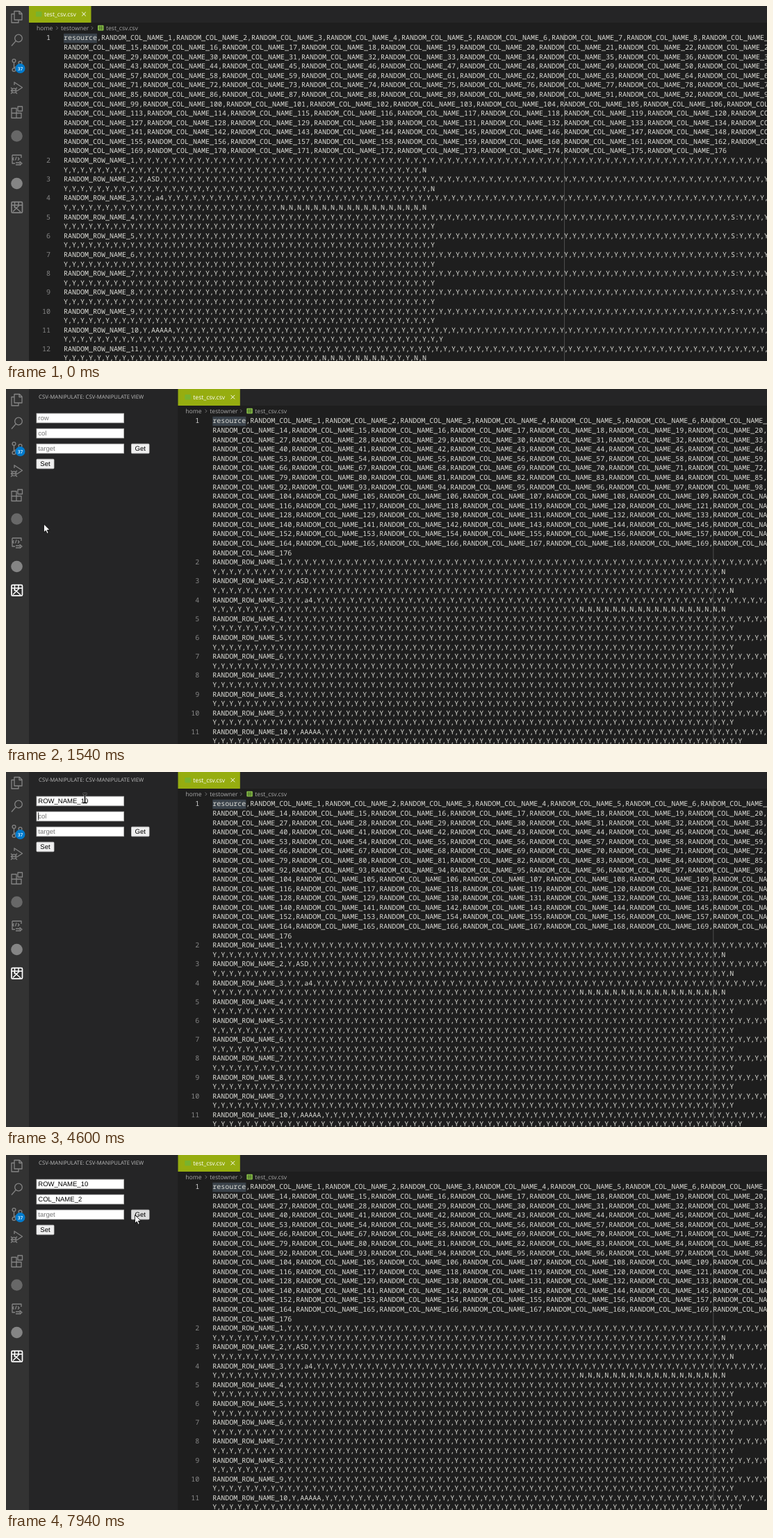
Write an HTML page that moves like this. It is 1095 by 512 pixels and loops after 8 s.

```html
<!DOCTYPE html>
<html lang="en">
<head>
<meta charset="utf-8">
<title>CSV editing in a code editor</title>
<style>
  html, body { margin: 0; width: 100%; height: 100%; overflow: hidden; background: #1e1e1e; }
  svg { display: block; width: 1095px; height: 512px; }
  text { white-space: pre; }
  .code { font: 10px "Noto Sans Mono", "DejaVu Sans Mono", monospace; fill: #dcdcd6; font-variant-ligatures: none; text-rendering: geometricPrecision; }
  .num { fill: #858585; text-anchor: end; }
  .num.current { fill: #d0d0d0; }
  .ui { font: 8.6px "Open Sans", "Noto Sans", sans-serif; fill: #a9a9a9; text-rendering: geometricPrecision; }
  .form { font: 9.52px "Liberation Sans", Arial, sans-serif; fill: #000; text-rendering: geometricPrecision; }
  .icon { fill: none; stroke: #858585; stroke-width: 1.3; stroke-linejoin: round; }
  .hidden { display: none; }
</style>
</head>
<body>
<svg viewBox="0 0 1095 512">
  <rect width="1095" height="512" fill="#1e1e1e"/>
  <rect width="1095" height="24" fill="#252526"/>

  <g id="editor">
    <rect x="33" width="89.5" height="24" fill="#96ad10"/>
    <rect x="43" y="8" width="8.5" height="7.5" rx="1" fill="#78b32e"/>
    <text class="ui" x="55" y="15" style="fill:#fff">test_csv.csv</text>
    <path d="M109.2 8.8l5.6 5.6m0-5.6l-5.6 5.6" stroke="#fff" stroke-width="1"/>
    <text class="ui" x="44" y="35">home</text>
    <text class="ui" x="79" y="35">testowner</text>
    <text class="ui" x="144" y="35">test_csv.csv</text>
    <path d="M72.3 29.5l2.3 2.3-2.3 2.3M122.8 29.5l2.3 2.3-2.3 2.3" fill="none" stroke="#8a8a8a" stroke-width=".8"/>
    <rect x="132" y="27.7" width="8.5" height="7.8" rx="1" fill="#8bc34a"/>
    <path d="M133 30.4h6.5M133 32.9h6.5M135 28.5v6.2M137.6 28.5v6.2" stroke="#38551c" stroke-width=".7"/>
    <rect x="83" y="39.8" width="48" height="13.4" fill="#3a424a"/>
    <path d="M803.5 39.5V512" stroke="#5a5a5a" stroke-width=".8"/>
    <g id="lines"></g>
  </g>

  <g id="sidebar">
    <rect x="33" width="214.3" height="512" fill="#252526"/>
    <text class="ui" x="47" y="14.3" style="font-size:7.75px;fill:#bbb">CSV-MANIPULATE: CSV-MANIPULATE VIEW</text>
    <g id="form"></g>
  </g>

  <rect width="33" height="512" fill="#333"/>
  <g class="icon">
    <path d="M12 7.5h7.5l3.5 3.5v9H12zM19 7.5v4h4M12 11.5H8v12.5h10v-4"/>
    <circle cx="18" cy="46.5" r="5.3"/><path d="M14.2 50.4L8 57.5"/>
    <circle cx="11.5" cy="79" r="2.4"/><circle cx="11.5" cy="92" r="2.4"/><circle cx="20.5" cy="82" r="2.4"/>
    <path d="M11.5 81.4v8.2M20.5 84.4c0 4-8 2-9 5.2"/>
    <path d="M12 114v-4l11.5 7.5-8 5.2"/><circle cx="11.5" cy="122" r="3.2"/>
    <path d="M8.3 122h6.4M7 117.8l2 1.8M6.8 122h1.5M7 126.5l2-1.8M16 117.8l-2 1.8M16 126.5l-2-1.8"/>
    <path d="M8 147.5h7v14H8zM8 154.5h14v7H8M17 145h6.5v6.5H17z"/>
    <path d="M9 215h13v4M9 215v12h4M11.5 218.5l-2 2 2 2M17 218.5l2 2-2 2M15 217.5l-1.5 5M14 226h5M14 229h5M20 224.5l3 2.5-3 2.5z"/>
  </g>
  <circle cx="20.5" cy="90" r="7" fill="#007acc"/>
  <text class="ui" x="20.5" y="92.5" text-anchor="middle" style="font-size:6.6px;font-weight:600;fill:#fff">37</text>
  <circle cx="15.5" cy="187.5" r="8.3" fill="#686868"/>
  <circle cx="15.5" cy="256" r="8.3" fill="#858585"/>
  <g id="tableIcon" class="icon">
    <rect x="8" y="282.7" width="15.5" height="15.5" rx="1.5" stroke-width="1.7"/>
    <path d="M8 287.3h15.5M12.5 283v4.3M18 283v4.3M12.3 287.3v4M10 296.5l9-9M11.5 288.5l9.5 8.5" stroke-width="1.5"/>
  </g>

  <g id="ibeam">
    <path d="M-3-6.5h2.2L0-5.8.8-6.5H3M0-5.8V5.8M-3 6.5h2.2L0 5.8l.8.7H3" fill="none" stroke="#ddd" stroke-width="2.2"/>
    <path d="M-3-6.5h2.2L0-5.8.8-6.5H3M0-5.8V5.8M-3 6.5h2.2L0 5.8l.8.7H3" fill="none" stroke="#000" stroke-width="1.4"/>
  </g>
  <path id="arrow" d="M0 0v12l2.8-2.6 1.9 4.3 2-.9-1.9-4.2h3.9z" fill="#fff" stroke="#000" stroke-width=".8"/>
  <path id="hand" d="M-1.2 0c0-1.6 2.4-1.6 2.4 0v5.2l5.2 1.2c1 .3 1.5 1 1.4 2l-.8 5.2-1.2 2.2H.8L-4 9.5c-1-1.5.6-2.6 1.7-1.5l1.1 1.2z" fill="#fff" stroke="#000" stroke-width=".8"/>
</svg>
<script>
const LOOP = 8000, OPEN_AT = 1130, FORM_AT = 1500, SIDEBAR = 214.3;
const LINE_HEIGHT = 13.59, WIDE = 283, NARROW = 247;
const $ = id => document.getElementById(id);

function add(parent, tag, attrs, content = "") {
  const el = document.createElementNS("http://www.w3.org/2000/svg", tag);
  for (const key in attrs) el.setAttribute(key, attrs[key]);
  el.textContent = content;
  return parent.appendChild(el);
}

// CSV contents
const COLUMNS = 176;
const header = ["resource", ...Array.from({ length: COLUMNS }, (_, i) => `RANDOM_COL_NAME_${i + 1}`)];

function csvRow(n) {
  const cells = Array(COLUMNS).fill("Y");
  const setTail = values => cells.splice(COLUMNS - values.length, values.length, ...values);
  if (n <= 2) setTail("N");
  if (n === 2) cells[1] = "ASD";
  if (n === 3) { cells[2] = "a4"; setTail("N".repeat(18)); }
  if (n >= 4 && n <= 9) cells[71] = "S:Y";
  if (n === 10) cells[1] = "AAAAA";
  if (n === 11) setTail("NNNYNNNNYYYNN");
  return [`RANDOM_ROW_NAME_${n}`, ...cells];
}
const records = [header, ...Array.from({ length: 11 }, (_, i) => csvRow(i + 1))];

function wrap(cells, width) {
  const lines = [""];
  cells.forEach((cell, i) => {
    const token = i < cells.length - 1 ? cell + "," : cell;
    if (lines.at(-1).length + token.length > width) lines.push("");
    lines[lines.length - 1] += token;
  });
  return lines;
}

function buildLayout(width) {
  const group = add($("lines"), "g", {});
  let y = 49.4;
  records.forEach((cells, i) => {
    add(group, "text", { class: i ? "code num" : "code num current", x: 64, y }, i + 1);
    for (const line of wrap(cells, width)) {
      add(group, "text", { class: "code", x: 83, y }, line.slice(0, 172));
      y += LINE_HEIGHT;
    }
  });
  return group;
}
const wideLayout = buildLayout(WIDE), narrowLayout = buildLayout(NARROW);

// Sidebar form
function addField(y, placeholder) {
  add($("form"), "rect", { x: 44, y, width: 125.5, height: 13.6, fill: "#fff", stroke: "#b8b8b8", "stroke-width": .8 });
  const label = add($("form"), "text", { class: "form", x: 46.3, y: y + 10 }, placeholder);
  const caret = add($("form"), "rect", { y: y + 1.2, width: .8, height: 10.8 });
  return { label, caret, placeholder };
}

function addButton(x, y, width, label) {
  const box = add($("form"), "rect", { x, y, width, height: 13.6, rx: 1, fill: "#efefef", stroke: "#d2d2d2", "stroke-width": .8 });
  add($("form"), "text", { class: "form", x: x + width / 2, y: y + 10.2, "text-anchor": "middle" }, label);
  return box;
}

const rowField = addField(35.2, "row"), colField = addField(57.2, "col"), targetField = addField(79.2, "target");
const getButton = addButton(180.5, 79.2, 25.5, "Get");
addButton(44, 101.2, 25, "Set");

const rowTyping = {
  text: "ROW_NAME_10",
  keys: [3030, 3127, 3223, 3320, 3510, 3660, 3780, 3950, 4040, 4320, 4450],
  carets: [[2320, 2850], [3030, 4600]]
};
const colTyping = {
  text: "COL_NAME_2",
  keys: [5290, 5390, 5490, 5670, 5860, 5950, 6040, 6130, 6880, 7090],
  carets: [[4600, 5100], [5290, 6700], [6880, 7600]]
};
const idle = { text: "", keys: [], carets: [] };

const show = (el, on) => el.classList.toggle("hidden", !on);

function updateField(field, typing, t) {
  const typed = typing.text.slice(0, typing.keys.filter(k => t >= k).length);
  field.label.textContent = typed || field.placeholder;
  field.label.style.fill = typed ? "#000" : "#757575";
  const width = typed ? field.label.getComputedTextLength() : 0;
  field.caret.setAttribute("x", 46.3 + width);
  show(field.caret, typing.carets.some(([on, off]) => t >= on && t < off));
}

// Pointer: each move runs in a few visible steps, then rests
const moves = [
  { start: 480, end: 950, steps: 6, from: [136, 468], to: [15.5, 291] },
  { start: 1190, end: 1910, steps: 12, from: [16, 289], to: [105, 71] },
  { start: 1980, end: 2320, steps: 5, from: [108, 66], to: [113.5, 38] },
  { start: 7640, end: 7940, steps: 6, from: [118, 41], to: [185.5, 86.5] }
];

function pointerAt(t) {
  const move = moves.findLast(m => t >= m.start);
  if (!move) return null;
  const { start, end, steps, from, to } = move;
  const last = steps - 1;
  const p = Math.min(last, Math.floor((t - start) / (end - start) * last + 1e-6)) / last;
  const eased = p * p * (3 - 2 * p);
  return from.map((v, i) => v + (to[i] - v) * eased);
}

function pointerKind([x, y], t) {
  if (t < OPEN_AT) return x < 33 ? "hand" : "ibeam";
  const overField = t >= FORM_AT && x > 44 && x < 170 && y > 30 && y < 72;
  return overField ? "ibeam" : "arrow";
}

function render(t) {
  const open = t >= OPEN_AT;
  $("editor").setAttribute("transform", `translate(${open ? SIDEBAR : 0})`);
  show(wideLayout, !open);
  show(narrowLayout, open);
  show($("sidebar"), open);
  show($("form"), t >= FORM_AT);

  const pointer = pointerAt(t);
  const kind = pointer && pointerKind(pointer, t);
  for (const id of ["ibeam", "arrow", "hand"]) {
    show($(id), id === kind);
    if (id === kind) $(id).setAttribute("transform", `translate(${pointer})`);
  }
  const iconHover = pointer && pointer[0] < 26;
  $("tableIcon").style.stroke = open || iconHover ? "#fff" : "#858585";
  const getHover = t > 7640 && pointer[0] > 180 && pointer[1] > 79;
  getButton.setAttribute("fill", getHover ? "#dcdcdc" : "#efefef");

  updateField(rowField, rowTyping, t);
  updateField(colField, colTyping, t);
  updateField(targetField, idle, t);
}

const began = performance.now();
function tick() {
  render((performance.now() - began) % LOOP);
  requestAnimationFrame(tick);
}
tick();
</script>
</body>
</html>
```
